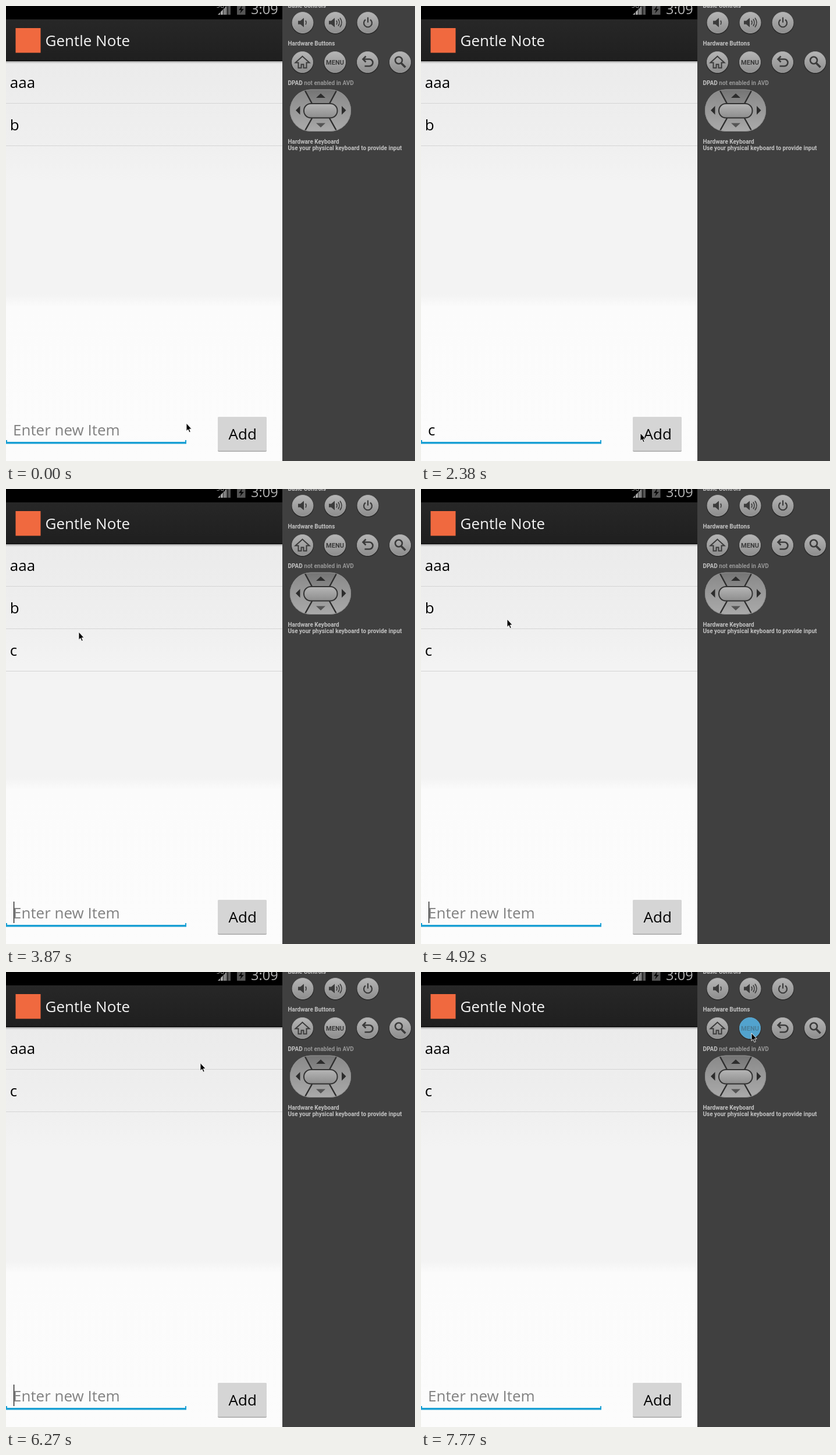
Animation of 703x783 px, one loop 8000 ms. Source, as an HTML page:

```html
<!DOCTYPE html>
<html lang="en">
<head>
<meta charset="utf-8">
<title>Todo list in an emulator</title>
<style>
  html, body { margin: 0; width: 100%; height: 100%; overflow: hidden; background: #404040; }
  svg { display: block; width: 703px; height: 783px; }
  .app { font: 26px "Open Sans", "Noto Sans", sans-serif; }
  .label { font: bold 10px Roboto, Arial, sans-serif; fill: #c2c2c2; }
  .icon { fill: none; stroke: #3b3b3b; stroke-width: 2.6; }
  .solid { fill: #3b3b3b; stroke: none; }
  .sep { fill: #d4d4d4; }
</style>
</head>
<body>
<svg viewBox="0 0 703 783">
  <defs>
    <linearGradient id="page" gradientUnits="userSpaceOnUse" x1="0" y1="95" x2="0" y2="783">
      <stop offset="0" stop-color="#ebebeb"/>
      <stop offset=".2" stop-color="#efefef"/>
      <stop offset=".3" stop-color="#f3f3f3"/>
      <stop offset=".583" stop-color="#f3f3f3"/>
      <stop offset=".615" stop-color="#fbfbfb"/>
      <stop offset="1" stop-color="#fcfcfc"/>
    </linearGradient>
    <linearGradient id="bar" x2="0" y2="1">
      <stop offset="0" stop-color="#272727"/>
      <stop offset="1" stop-color="#1f1f1f"/>
    </linearGradient>
    <linearGradient id="shade" x2="0" y2="1">
      <stop offset="0" stop-color="#000" stop-opacity=".3"/>
      <stop offset="1" stop-color="#000" stop-opacity="0"/>
    </linearGradient>
    <linearGradient id="metal" x2="0" y2="1">
      <stop offset="0" stop-color="#b6b6b6"/>
      <stop offset="1" stop-color="#8d8d8d"/>
    </linearGradient>
    <linearGradient id="pad" x2="0" y2="1">
      <stop offset="0" stop-color="#747474"/>
      <stop offset="1" stop-color="#acacac"/>
    </linearGradient>
    <clipPath id="padClip"><rect x="488" y="143.5" width="105" height="72.5" rx="36"/></clipPath>
  </defs>

  <rect width="475" height="783" fill="url(#page)"/>
  <rect width="475" height="24" fill="#000"/>
  <rect y="23" width="475" height="72" fill="url(#bar)"/>
  <rect y="93" width="475" height="2" fill="#131313"/>
  <rect y="95" width="475" height="4" fill="url(#shade)"/>
  <rect x="16.5" y="38" width="43" height="42.5" fill="#f0693f"/>

  <g class="app">
    <text x="67.5" y="69" fill="#f3f3f3">Gentle Note</text>
    <text x="421" y="14" font-size="23.5" fill="#b3b3b3">3:09</text>
    <text x="362" y="3" font-size="10" fill="#aaa">3G</text>
    <path d="M364 15L379 0V15Z" fill="#a9a9a9"/>
    <path d="M368.5 10V15M373.5 5V15" stroke="#000"/>
    <path d="M380 0H386V15H380Z" fill="#555"/>
    <path d="M376.5 0V15M381.5 0V15" stroke="#222"/>
    <rect x="397" y="-3" width="14.5" height="18" fill="#555"/>
    <path d="M406 -1L400 7H404L402 13L409 5H405Z" fill="#0a0a0a"/>

    <rect id="held" y="168" width="475" height="72"/>
    <g id="rows"></g>

    <text id="field" x="12" y="739"></text>
    <rect id="caret" x="13" y="710" width="1.2" height="37"/>
    <path d="M0 747H2V750H308V747H310V753.5H0Z" fill="#1aa0d4"/>
    <rect x="364" y="709" width="84" height="58" rx="2" fill="#a8a8a8"/>
    <rect id="add" x="364" y="707" width="84" height="58.5" rx="1.5"/>
    <text x="382.5" y="746">Add</text>
  </g>

  <rect x="475" width="228" height="783" fill="#404040"/>
  <g class="label">
    <text x="484.5" y="3">Basic Controls</text>
    <text x="484.5" y="68">Hardware Buttons</text>
    <text x="484.5" y="136">DPAD <tspan fill="#969696">not enabled in AVD</tspan></text>
    <text x="484.5" y="237">Hardware Keyboard</text>
    <text x="484.5" y="248">Use your physical keyboard to provide input</text>
  </g>
  <g id="keys"></g>

  <g clip-path="url(#padClip)">
    <rect x="488" y="143" width="105" height="74" fill="url(#pad)"/>
    <path d="M488 143H513L527 168V193L513 217H488ZM593 143H569L555 168V193L569 217H593Z" fill="#a8a8a8" opacity=".4"/>
    <path d="M512 142L526 168M570 142L556 168M526 193L512 218M556 193L570 218" stroke="#2e2e2e" stroke-width="2.4"/>
  </g>
  <rect x="488.5" y="144" width="104" height="71.5" rx="35.5" fill="none" stroke="#909090"/>
  <rect x="512" y="168" width="57.5" height="24.5" rx="12" fill="url(#metal)" stroke="#333" stroke-width="2"/>
  <path d="M533 158L541 150.5L549 158Z M505.5 172V187L498 179.5Z M577 172V187L584.5 179.5Z" fill="#2c2c2c"/>
  <path d="M533 201.5H549L541 209Z" fill="#555"/>

  <path id="mouse" d="M0 0V13.5L3 10.8L5 15.8L7.2 14.8L5.2 10H9.2Z" stroke="#fff" stroke-width=".9"/>
</svg>

<script>
const LOOP = 8000;
const TICK = 149.3; // the screen refreshes once per tick; times below are in ticks
const FOCUS = 3, TYPE = 12, PRESS = 18, ADD = 19, HOLD = 34, REMOVE = 37;
const BLINK = 3.5;
const $ = id => document.getElementById(id);

// Mouse moves: start, length, x and y of the goal.
const moves = [
  [0, 1, 247, 695], [13, 3, 377, 735], [16, 2, 393, 733],
  [20, 5, 125, 246], [27, 3, 148, 224],
  [39, 3, 334, 156.5], [42, 1, 393, 123], [44, 4, 612, 99], [48, 4, 568, 105]
];

const wave = '<path d="M5 -3.5Q7 0 5 3.5" stroke-width="1.6"/>';
const speaker = '<path class="solid" d="M-8 -3H-4L2 -8V8L-4 3H-8Z"/>' + wave;
const iconRows = [
  [speaker,
   `<g transform="translate(-3)">${speaker}<path d="M8 -6Q12 0 8 6M11 -8Q17 0 11 8" stroke-width="1.6"/></g>`,
   '<path d="M-4 -5A7 7 0 1 0 4 -5M0 -9V0" stroke-width="2.2"/>'],
  ['<path d="M-12 1L0 -10L12 1H7V10H2V4H-2V10H-7V1Z" stroke-width="2"/>',
   '<text class="solid" text-anchor="middle" y="4" font-family="Roboto, sans-serif" font-weight="700" font-size="11">MENU</text>',
   '<path d="M-7 -5H3A6 6 0 0 1 3 7H-5M-3 -10L-8 -5L-3 0"/>',
   '<circle cx="-2.5" cy="-3" r="6"/><path d="M2 2L9 9" stroke-width="3.5"/>']
];
const keys = iconRows.flatMap((icons, row) =>
  icons.map((icon, i) => ({ x: 510 - row / 2 + 56 * i, y: 28.5 + 68 * row, icon })));

$("keys").innerHTML = keys.map(({ x, y, icon }) =>
  `<g class="icon" transform="translate(${x} ${y})">
    <circle r="19.5" cy="1" fill="#303030" stroke="none"/>
    <circle class="face" r="18" fill="url(#metal)" stroke="#a4a4a4" stroke-width="1"/>
    <g class="glyph">${icon}</g></g>`).join("");
const faces = document.querySelectorAll(".face");
const glyphs = document.querySelectorAll(".glyph");

const ease = u => u * u * (3 - 2 * u);

function mouseAt(n) {
  let x = 310, y = 718;
  for (const [start, span, toX, toY] of moves) {
    const k = ease(Math.min(1, Math.max(0, (n - start) / span)));
    x += (toX - x) * k;
    y += (toY - y) * k;
  }
  return [x, y];
}

// The blink restarts with every edit of the field.
function caretOn(n) {
  const since = [ADD, TYPE, FOCUS].find(start => n >= start);
  return since !== undefined && Math.floor((n - since) / BLINK) % 2 === 0;
}

function drawRows(n) {
  const items = ["aaa"];
  if (n < REMOVE) items.push("b");
  if (n >= ADD) items.push("c");
  $("rows").innerHTML = items.map((item, i) =>
    `<text x="6.8" y="${141 + 73 * i}">${item}</text>
     <rect class="sep" y="${167 + 73 * i}" width="475" height="1"/>`).join("");
}

function draw(n) {
  const [mx, my] = mouseAt(n);
  const typed = n >= TYPE && n < ADD;
  const holding = n >= HOLD && n < REMOVE;
  const grey = 205 - 10 * (n - HOLD);
  $("mouse").setAttribute("transform", `translate(${mx} ${my})`);
  $("caret").setAttribute("opacity", caretOn(n) ? 1 : 0);
  $("field").textContent = typed ? "c" : "Enter new Item";
  $("field").setAttribute("fill", typed ? "#000" : "#818181");
  $("held").setAttribute("fill", holding ? `rgb(${grey},${grey},${grey})` : "none");
  $("add").setAttribute("fill", n === PRESS ? "#9fd0e3" : "#d5d5d5");
  drawRows(n);
  keys.forEach(({ x, y }, i) => {
    const hover = Math.hypot(mx - x, my - y) < 19;
    faces[i].setAttribute("fill", hover ? "#52a3ce" : "url(#metal)");
    faces[i].setAttribute("stroke", hover ? "#5fabd3" : "#a4a4a4");
    glyphs[i].setAttribute("opacity", hover ? 0.35 : 1);
  });
}

const begin = performance.now();
let shown = -1;
function frame() {
  const t = (performance.now() - begin) % LOOP;
  const n = Math.floor((t + 12) / TICK);
  if (n !== shown) draw(shown = n);
  requestAnimationFrame(frame);
}
frame();
</script>
</body>
</html>
```
